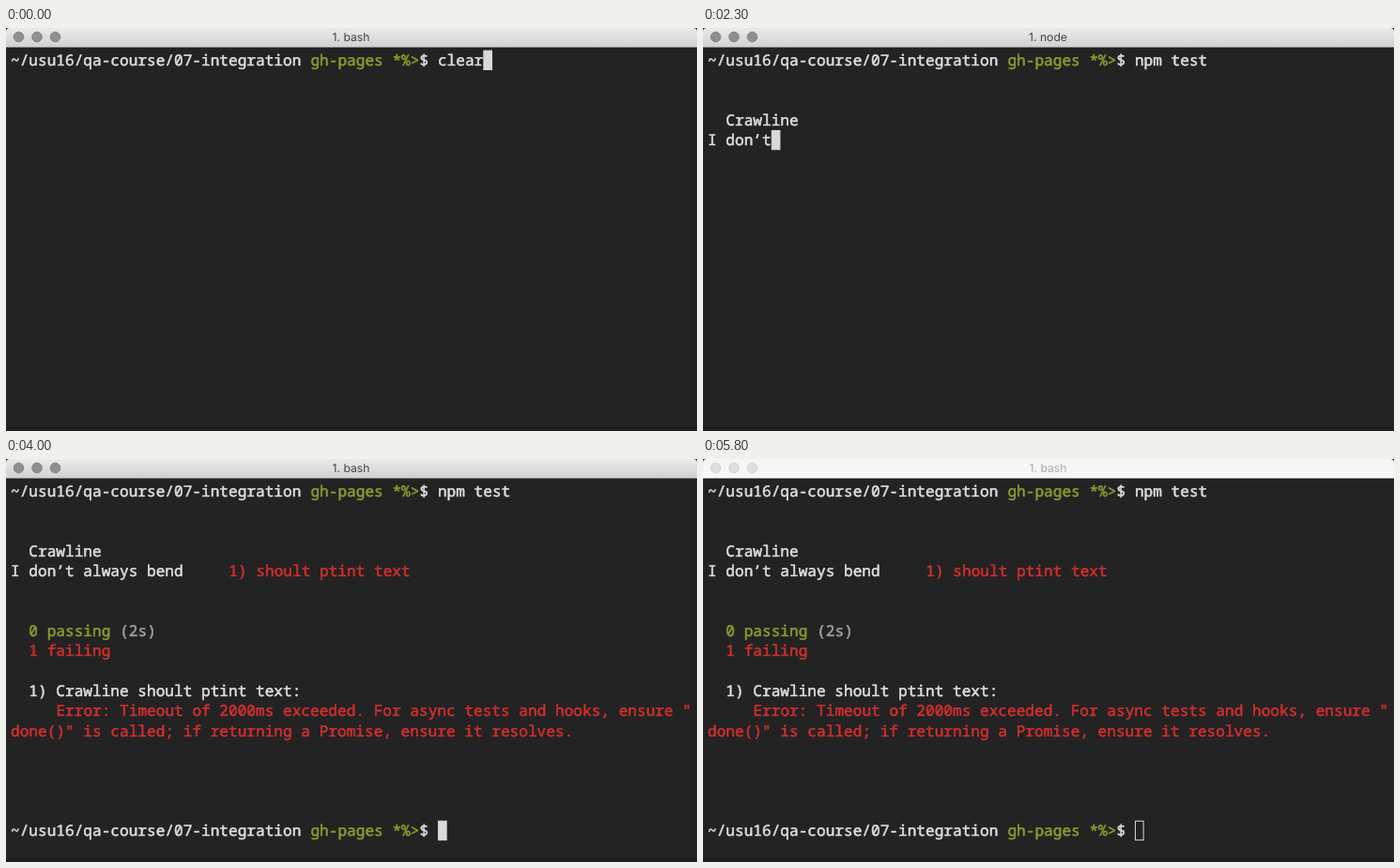
Recreate the animation shown at these times as an HTML page. Size 736 px wide and 430 px high, loop 5.85 s.

```html
<!DOCTYPE html>
<html lang="en">
<head>
<meta charset="utf-8">
<title>Terminal</title>
<style>
  html, body { margin: 0; width: 100%; height: 100%; overflow: hidden; background: #232323; }
  svg { display: block; width: 736px; height: 430px; }
  text { white-space: pre; text-rendering: geometricPrecision; }
  #screen { fill: #dedede; stroke: #dedede; stroke-width: 0.55; }
  #screen text { font: 16.13px "Noto Sans Mono", "DejaVu Sans Mono", monospace; }
  #screen .green { fill: #8a9b2e; stroke: #8a9b2e; }
  #screen .red { fill: #d12f2f; stroke: #d12f2f; }
  #screen .grey { fill: #a0a0a0; stroke: #a0a0a0; }
  #title { font: 12.2px Inter, Roboto, sans-serif; text-anchor: middle; fill: #454545; }
  #dots circle { fill: #8f8f8f; stroke: #828282; }
  .idle #title { fill: #ababab; }
  .idle #bar { fill: #f6f6f6; }
  .idle #edge { fill: #a0a0a0; }
  .idle #dots circle { fill: #dedede; stroke: #d3d3d3; }
  #cursor { fill: #d9d9d9; stroke: #d9d9d9; }
  .idle #cursor { fill: none; }
  #pointer { fill: none; stroke: #d0d0d0; stroke-width: 1.1; }
</style>
</head>
<body>
<svg id="stage" viewBox="0 0 736 430">
  <defs>
    <linearGradient id="metal" x2="0" y2="1">
      <stop offset="0" stop-color="#ebebeb"/>
      <stop offset="1" stop-color="#d1d1d1"/>
    </linearGradient>
  </defs>
  <rect width="736" height="430" fill="#232323"/>
  <rect y="426" width="736" height="4" fill="#1f1e1f"/>
  <path id="bar" d="M0 20V4Q0 0 4 0H732Q736 0 736 4V20Z" fill="url(#metal)"/>
  <rect id="edge" y="20" width="736" height="1" fill="#868686"/>
  <g id="dots">
    <circle cx="13.5" cy="9.5" r="5.3"/>
    <circle cx="33" cy="9.5" r="5.3"/>
    <circle cx="52.5" cy="9.5" r="5.3"/>
  </g>
  <text id="title" x="367.5" y="14.3"></text>
  <g id="screen"></g>
  <rect id="cursor"/>
  <path id="pointer" d="M-3 -7Q0 -7 0 -5Q0 -7 3 -7M0 -5V5M-3 7Q0 7 0 5Q0 7 3 7"/>
</svg>
<script>
  const LOOP = 5850, STEP = 50;
  const LEFT = 5, TOP = 23.7, COL = 9.68, ROW = 21.3, BASE = 16.2;
  const CLEARED = 50, ENTER = 750, NODE = 1000, SUITE = 1550, FAIL = 3500, DONE = 3900, BLUR = 5300;
  const COMMAND = "npm test", SPEECH = "I don’t always bend";

  const byId = id => document.getElementById(id);
  const stage = byId("stage"), screen = byId("screen"), title = byId("title");
  const cursor = byId("cursor"), pointer = byId("pointer");

  const group = () => screen.appendChild(document.createElementNS(stage.namespaceURI, "g"));

  function write(parent, row, col, string, color = "") {
    const node = document.createElementNS(stage.namespaceURI, "text");
    node.setAttribute("x", LEFT + col * COL);
    node.setAttribute("y", TOP + row * ROW + BASE);
    node.setAttribute("class", color);
    node.textContent = string;
    return parent.appendChild(node);
  }

  function prompt(parent, row) {
    write(parent, row, 0, "~/usu16/qa-course/07-integration");
    write(parent, row, 33, "gh-pages *%>", "green");
    write(parent, row, 45, "$");
  }

  const first = group(), suite = group(), report = group(), last = group();
  prompt(first, 0);
  const command = write(first, 0, 47, "");
  write(suite, 3, 2, "Crawline");
  const speech = write(suite, 4, 0, "");
  write(report, 4, 24, "1) shoult ptint text", "red");
  write(report, 7, 2, "0 passing", "green");
  write(report, 7, 12, "(2s)", "grey");
  write(report, 8, 2, "1 failing", "red");
  write(report, 10, 2, "1) Crawline shoult ptint text:");
  write(report, 11, 5, 'Error: Timeout of 2000ms exceeded. For async tests and hooks, ensure "', "red");
  write(report, 12, 0, 'done()" is called; if returning a Promise, ensure it resolves.', "red");
  prompt(last, 17);
  cursor.setAttribute("width", COL - 1);
  cursor.setAttribute("height", ROW - 1);

  const typed = (string, t, start, pace) =>
    string.slice(0, Math.max(0, Math.floor((t - start) / pace)));

  const show = (node, on) => node.setAttribute("visibility", on ? "visible" : "hidden");

  // time, x, y
  const path = [[4500, 488, 235], [4700, 464.5, 183], [4900, 464.5, 183], [5250, 590, -10]];

  function pointerAt(t) {
    const i = path.findIndex(([end], k) => k && t < end);
    if (t < path[0][0] || i < 0) return null;
    const [t0, x0, y0] = path[i - 1], [t1, x1, y1] = path[i];
    const u = (t - t0) / (t1 - t0), ease = u * u * (3 - 2 * u);
    return [x0 + (x1 - x0) * ease, y0 + (y1 - y0) * ease];
  }

  function cursorAt(t) {
    if (t >= DONE) return [17, 47];
    if (t >= FAIL) return [17, 0];
    if (t >= SUITE) return [4, speech.textContent.length];
    if (t >= ENTER) return [1, 0];
    return [0, 47 + command.textContent.length];
  }

  function render(t) {
    command.textContent = t < CLEARED ? "clear" : typed(COMMAND, t, 60, 60);
    speech.textContent = typed(SPEECH, t, 1640, 93);
    title.textContent = t >= NODE && t < DONE ? "1. node" : "1. bash";
    show(suite, t >= SUITE);
    show(report, t >= FAIL);
    show(last, t >= DONE);
    stage.classList.toggle("idle", t >= BLUR);

    const [row, col] = cursorAt(t);
    cursor.setAttribute("x", LEFT + col * COL + 0.5);
    cursor.setAttribute("y", TOP + row * ROW + 0.5);

    const spot = pointerAt(t);
    show(pointer, spot);
    if (spot) pointer.setAttribute("transform", `translate(${spot})`);
  }

  const begin = performance.now();
  function tick() {
    const t = (performance.now() - begin) % LOOP;
    render(Math.floor(t / STEP) * STEP);
    requestAnimationFrame(tick);
  }
  render(0);
  requestAnimationFrame(tick);
</script>
</body>
</html>
```
